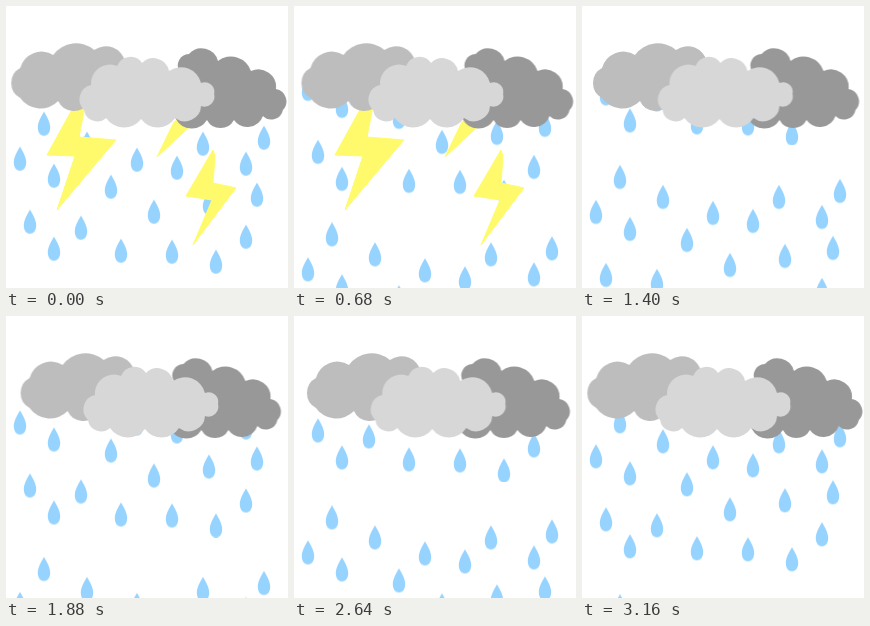
An HTML page that plays this animation: 282x282 px, repeating every 3.2 s.

```html
<!DOCTYPE html>
<html lang="en">
<head>
<meta charset="utf-8">
<title>Thunderstorm</title>
<style>
  html, body { margin: 0; width: 100%; height: 100%; overflow: hidden; background: #fff; }
  svg { display: block; width: 100%; height: 100%; }

  .rain { fill: #97d3ff; animation: fall 3.2s linear infinite; }
  .bolts { fill: #fffa6b; animation: flash 3.2s step-end infinite; }
  .cloud { animation: sway .4s cubic-bezier(.37, 0, .63, 1) infinite alternate; }
  #left { --shift: 12px; fill: #bdbdbd; }
  #right { --shift: -7px; fill: #989898; }
  #middle { --shift: 5px; fill: #d7d7d7; }

  @keyframes fall { to { transform: translateY(547px); } }
  @keyframes flash { 0% { opacity: 1; } 33.3%, 100% { opacity: 0; } }
  @keyframes sway { to { transform: translateX(var(--shift)); } }
</style>
</head>
<body>
<svg viewBox="0 0 282 282">
  <defs>
    <clipPath id="below"><rect y="80" width="282" height="202"/></clipPath>
    <path id="drop" d="M0-12C2-9 6-2 6.2 3C6.4 8 4 12 0 12S-6.4 8-6.2 3C-6-2-2-9 0-12Z"/>
    <g id="shower"></g>
  </defs>

  <g clip-path="url(#below)">
    <g class="rain">
      <use href="#shower"/>
      <use href="#shower" y="-180.5"/>
      <use href="#shower" y="-362"/>
      <use href="#shower" y="-547"/>
    </g>
  </g>

  <g class="bolts" stroke="#fffa6b" stroke-linejoin="round">
    <path d="M68 100L79 100L73 131L110 134L51 204L69 150L41 149Z"/>
    <path d="M151 151L168 116L190 100V115Z"/>
    <path d="M207 144L209 150L207 177L230 182L187 239L206 194L180 190Z"/>
  </g>

  <path class="cloud" id="right"/>
  <path class="cloud" id="left"/>
  <path class="cloud" id="middle"/>
</svg>

<script>
  const byId = id => document.getElementById(id);

  // Joins the notches of an outline, clockwise, with round puffs.
  function puffs(notches) {
    let [x, y] = notches.at(-1);
    let d = `M${x} ${y}`;
    for (const [nx, ny] of notches) {
      const chord = Math.hypot(nx - x, ny - y);
      const bulge = Math.min(.3 * chord, 9);
      const r = (chord * chord / 4 + bulge * bulge) / (2 * bulge);
      d += `A${r} ${r} 0 0 1 ${nx} ${ny}`;
      [x, y] = [nx, ny];
    }
    return d + 'Z';
  }

  const outlines = {
    left: [[14, 92], [14, 62], [47, 49], [88, 44], [119, 56], [112, 95], [82, 97], [52, 95]],
    right: [[174, 66], [183, 48], [212, 55], [245, 65], [270, 83], [277, 104],
            [257, 110], [228, 114], [201, 114], [170, 113]],
    middle: [[78, 104], [85, 79], [111, 60], [136, 57], [163, 65], [195, 77], [208, 88],
             [195, 100], [169, 112], [135, 113], [100, 112]]
  };
  for (const id in outlines) byId(id).setAttribute('d', puffs(outlines[id]));

  // Centres of the drops in one shower
  const drops = [
    [14, 147], [24, 210], [38, 112], [48, 164], [48, 237], [75, 216], [81, 132],
    [105, 175], [115, 239], [131, 148], [148, 200], [166, 240], [171, 156], [197, 132],
    [203, 191], [210, 250], [240, 152], [240, 225], [251, 183], [258, 126]
  ];
  byId('shower').innerHTML = drops.map(([x, y]) => `<use href="#drop" x="${x}" y="${y}"/>`).join('');
</script>
</body>
</html>
```
